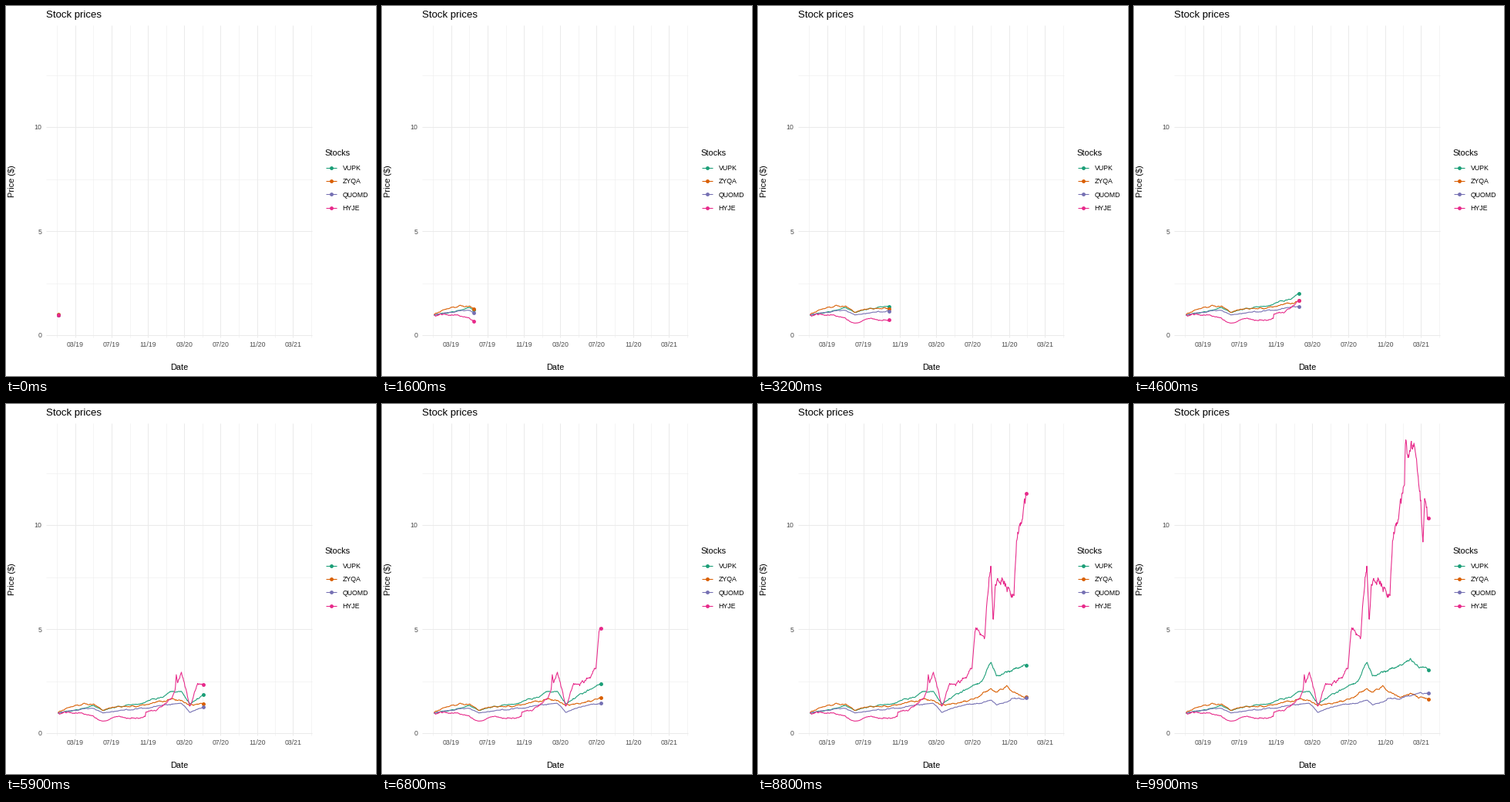
A matplotlib script for the animation above (10000 ms loop, 480 by 480 pixels).

```python
import numpy as np
import matplotlib.pyplot as plt
from matplotlib.animation import FuncAnimation

FRAMES, INTERVAL = 100, 100
PX = 0.9                       # points per pixel at 80 dpi
LEFT, RIGHT, TOP, BOTTOM = 51, 396.5, 24, 429.7
X_START, X_END, X_STEP = 67, 381, 3.175
GRID, TICK = "#EBEBEB", "#4D4D4D"

plt.rcParams["font.family"] = "Liberation Sans"

# Turning points shared by the three calm curves, and their prices
TURNS = [67, 89, 113, 125, 146, 170, 214, 227, 238, 255,
         278, 290, 302, 309, 322, 328, 345, 358, 370, 381]
GREEN = [.95, 1.12, 1.34, 1.1, 1.3, 1.39, 2.02, 2.02, 1.42, 1.86,
         2.3, 2.5, 3.42, 2.75, 2.95, 3, 3.3, 3.6, 3.15, 3.06]
ORANGE = [1, 1.35, 1.41, 1.1, 1.3, 1.29, 1.66, 1.58, 1.35, 1.42,
          1.65, 1.88, 2.15, 1.98, 2.3, 2.05, 1.72, 1.93, 1.72, 1.63]
PURPLE = [1, 1.1, 1.2, .98, 1.09, 1.18, 1.4, 1.44, 1, 1.26,
          1.4, 1.45, 1.6, 1.36, 1.5, 1.66, 1.66, 1.8, 1.95, 1.93]

# The wild curve has its own turning points
PINK_X = [67, 80, 110, 126, 145, 160, 180, 181, 194, 214, 219,
          220.5, 222, 227, 238, 248, 267, 277, 281, 293.5, 296,
          301.5, 304.5, 307.5, 318, 331.5, 335, 350.5, 352, 363,
          368, 374.5, 376.5, 381]
PINK = [1, 1.02, .86, .59, .82, .71, .8, 1.03, 1.08, 1.66, 2.1,
        2.87, 2.42, 2.95, 1.28, 2.4, 2.65, 3.1, 4.9, 4.5, 6.1,
        8.05, 5.3, 7.2, 7.2, 6.6, 9.3, 12, 14.2, 13.9,
        12.4, 9.1, 11.3, 10.33]

STOCKS = [
    ("VUPK", "#1B9E77", TURNS, GREEN, .007),
    ("ZYQA", "#D95F02", TURNS, ORANGE, .008),
    ("QUOMD", "#7570B3", TURNS, PURPLE, .006),
    ("HYJE", "#E7298A", PINK_X, PINK, .014),
]


def price_y(p):
    return 426.8 - 27 * p


def daily(kx, ky, vol, seed):
    """Join the knots and add a random walk pinned to zero at each knot."""
    x = np.linspace(X_START, X_END, 566)
    walk = np.random.default_rng(seed).normal(size=x.size).cumsum()
    walk -= np.interp(x, kx, np.interp(kx, x, walk))
    return x, price_y(np.interp(x, kx, ky) * (1 + vol * walk))


def label(x, y, s, size, color="black", **kw):
    kw = {"ha": "left", "va": "baseline", **kw}
    ax.text(x, y, s, fontsize=size * PX, color=color, **kw)


def stroke(xs, ys, color, width, z):
    return ax.plot(xs, ys, color=color, lw=width * PX, zorder=z,
                   solid_capstyle="butt", solid_joinstyle="round")[0]


def dot(x, y, color, z):
    return ax.plot([x], [y], "o", color=color, ms=4.9 * PX, mew=0, zorder=z)[0]


fig = plt.figure(figsize=(6, 6), dpi=80, facecolor="white")
ax = fig.add_axes([0, 0, 1, 1])
ax.set(xlim=(-.5, 479.5), ylim=(479.5, -.5))
ax.axis("off")

# Grid and tick labels, one major line every four months
months = np.datetime64("2018-11") + 4 * np.arange(9)
days = (months.astype("datetime64[D]") - np.datetime64("2019-03-01")).astype(int)
major = 89.2 + .3868 * days
for x in (major[1:] + major[:-1]) / 2:
    stroke([x, x], [TOP, BOTTOM], GRID, .55, 0)
for p in (2.5, 7.5, 12.5):
    stroke([LEFT, RIGHT], [price_y(p)] * 2, GRID, .55, 0)
for x, month in zip(major[1:-1], months[1:-1]):
    year, mm = str(month).split("-")
    stroke([x, x], [TOP, BOTTOM], GRID, 1.07, 1)
    label(x, 442, f"{mm}/{year[2:]}", 8.8, TICK, ha="center")
for p in (0, 5, 10):
    y = price_y(p)
    stroke([LEFT, RIGHT], [y, y], GRID, 1.07, 1)
    label(46, y + 3.2, str(p), 8.8, TICK, ha="right")

# Titles
label(51, 15, "Stock prices", 13.2)
label(224.5, 472, "Date", 11, ha="center")
label(13, 227, "Price ($)", 11, rotation=90, ha="right", va="center")
label(413, 194, "Stocks", 11)

curves = []
for i, (name, color, kx, ky, vol) in enumerate(STOCKS):
    y = 209.2 + 17.28 * i
    stroke([414.7, 428.7], [y, y], color, 1.07, 3)
    dot(421.7, y, color, 4)
    label(436, y + 3.4, name, 8.8)
    line = stroke([], [], color, 1.07, 3 + .1 * i)
    head = dot(X_START, 400, color, 4 + .1 * i)
    curves.append((*daily(kx, ky, vol, 11 + i), line, head))


def draw(frame):
    now = min(67.7 + X_STEP * frame, X_END)
    artists = []
    for x, y, line, head in curves:
        seen = x < now
        y_now = np.interp(now, x, y)
        line.set_data(np.append(x[seen], now), np.append(y[seen], y_now))
        head.set_data([now], [y_now])
        artists += [line, head]
    return artists


anim = FuncAnimation(fig, draw, frames=FRAMES, interval=INTERVAL,
                     repeat=True, repeat_delay=0, blit=False)
plt.show()
```
